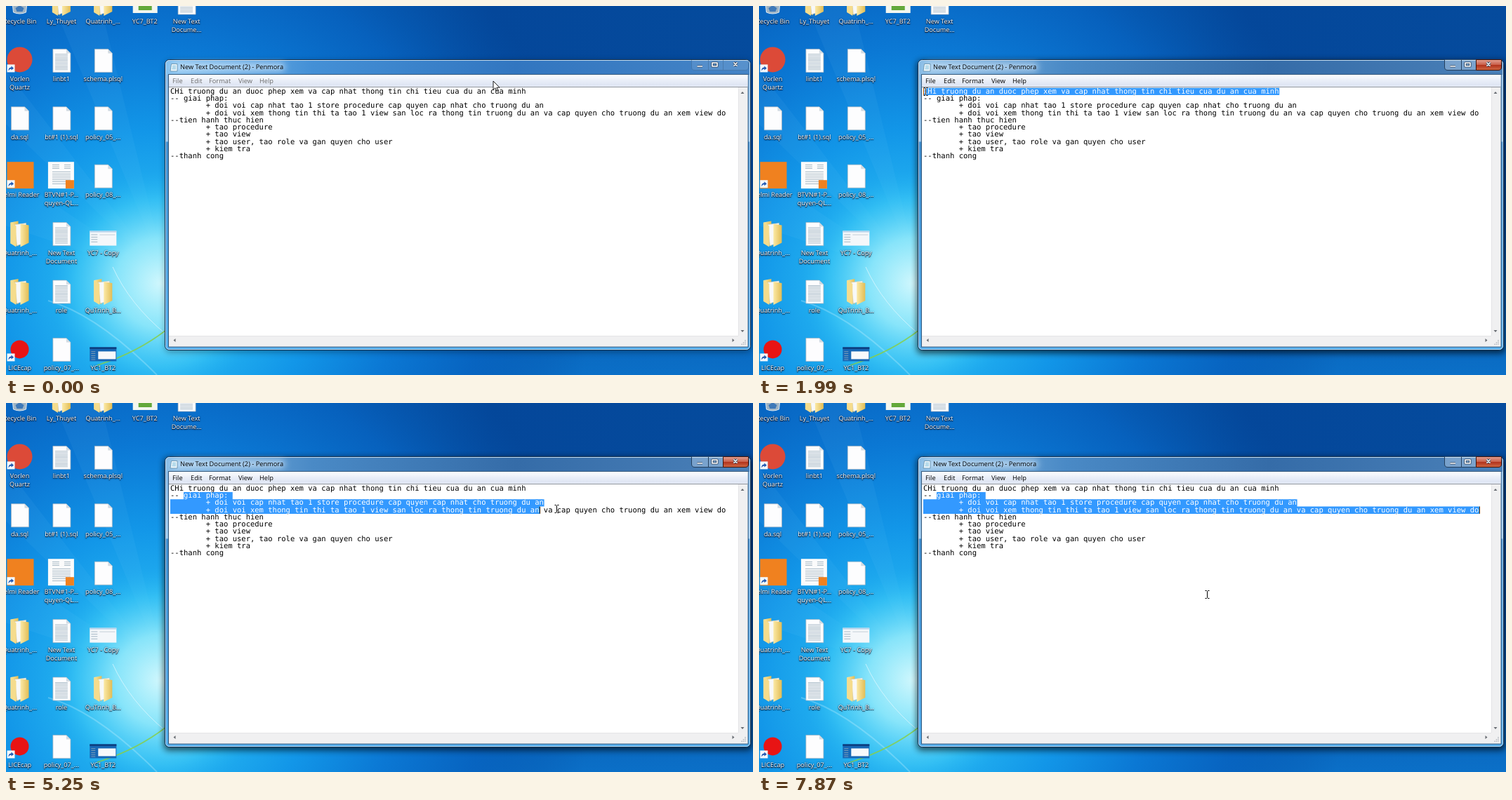
An HTML page for the animation above (8000 ms loop, 1064 px wide and 526 px high).

```html
<!DOCTYPE html>
<html lang="vi">
<head>
<meta charset="utf-8">
<title>Desktop</title>
<style>
  html, body { margin: 0; width: 100%; height: 100%; overflow: hidden; background: #0a56a8; }
  svg { display: block; width: 100vw; height: 100vh; }
  text { text-rendering: geometricPrecision; font-family: "Open Sans", "Noto Sans", sans-serif; }
  #icons text { font-size: 9.1px; fill: #fff; text-anchor: middle; filter: drop-shadow(.5px 1px .6px #012) drop-shadow(0 0 .8px #013c); }
  .ui { font-size: 9.25px; }
  .menu { fill: #6d6d6d; }
  .code text { font: 10.53px "DejaVu Sans Mono", "Liberation Mono", monospace; white-space: pre; }
  .active, .on .idle { display: none; }
  .on .active { display: inline; }
  .on .menu { fill: #000; }
  .invert { fill: none; stroke: #fff; mix-blend-mode: difference; }
</style>
</head>
<body>
<svg id="stage" viewBox="0 0 1064 526" preserveAspectRatio="none">
  <defs>
    <linearGradient id="sky">
      <stop stop-color="#0a60bc"/><stop offset=".4" stop-color="#0553a9"/>
      <stop offset=".65" stop-color="#04479a"/><stop offset="1" stop-color="#054b9d"/>
    </linearGradient>
    <linearGradient id="floor" x2="0" y2="1">
      <stop offset=".55" stop-color="#0d7cd6" stop-opacity="0"/><stop offset="1" stop-color="#0d7cd6" stop-opacity=".75"/>
    </linearGradient>
    <radialGradient id="halo" gradientUnits="userSpaceOnUse" cx="215" cy="400" r="620">
      <stop stop-color="#5ad6f8"/><stop offset=".2" stop-color="#22b0f0"/>
      <stop offset=".36" stop-color="#1296e8"/><stop offset=".55" stop-color="#0b78d4"/>
      <stop offset=".75" stop-color="#0763c0" stop-opacity=".9"/><stop offset="1" stop-color="#0553a9" stop-opacity="0"/>
    </radialGradient>
    <radialGradient id="core" gradientUnits="userSpaceOnUse" cx="220" cy="395" r="160">
      <stop stop-color="#d0f7fd"/><stop offset=".4" stop-color="#94eafb" stop-opacity=".85"/>
      <stop offset=".75" stop-color="#44cdf7" stop-opacity=".5"/><stop offset="1" stop-color="#22b0f0" stop-opacity="0"/>
    </radialGradient>
    <linearGradient id="frame" x2="0" y2="1">
      <stop stop-color="#7fb2e0"/><stop offset=".28" stop-color="#9cc8ec"/>
      <stop offset=".285" stop-color="#3f8ccc"/><stop offset="1" stop-color="#55aeec"/>
    </linearGradient>
    <linearGradient id="barOn">
      <stop stop-color="#8abde6"/><stop offset=".25" stop-color="#4a8ac6"/>
      <stop offset=".6" stop-color="#356ca8"/><stop offset="1" stop-color="#4a80b8"/>
    </linearGradient>
    <linearGradient id="barOff">
      <stop stop-color="#86c2ef"/><stop offset=".25" stop-color="#4490d6"/>
      <stop offset=".6" stop-color="#3276c0"/><stop offset="1" stop-color="#4584c6"/>
    </linearGradient>
    <linearGradient id="menuBg" x2="0" y2="1">
      <stop stop-color="#fdfeff"/><stop offset=".5" stop-color="#e9eef8"/><stop offset="1" stop-color="#dce3f2"/>
    </linearGradient>
    <linearGradient id="red" x2="0" y2="1">
      <stop stop-color="#e3a193"/><stop offset=".48" stop-color="#c9604a"/>
      <stop offset=".5" stop-color="#b0301a"/><stop offset="1" stop-color="#d06a45"/>
    </linearGradient>
    <linearGradient id="yellow"><stop stop-color="#fbe9a6"/><stop offset="1" stop-color="#e2bd55"/></linearGradient>
    <filter id="blur" x="-20%" y="-60%" width="140%" height="220%"><feGaussianBlur stdDeviation="5"/></filter>
    <clipPath id="selClip"><path id="sel"/></clipPath>
  </defs>

  <rect width="1064" height="526" fill="url(#sky)"/>
  <rect width="1064" height="526" fill="url(#floor)"/>
  <rect width="1064" height="526" fill="url(#halo)"/>
  <g fill="#8fdcff" opacity=".06">
    <path d="M230 390L-40 40V130Z"/><path d="M230 390L-40 210V300Z"/><path d="M230 390L60-20H130Z"/>
  </g>
  <rect width="1064" height="526" fill="url(#core)"/>
  <g fill="none" stroke="#e6faff">
    <path d="M152 372Q176 425 228 468" opacity=".7"/>
    <path d="M60 420Q130 440 215 526" opacity=".25" stroke-width="2"/>
    <path d="M130 512Q185 495 228 462" stroke="#86cf4a" stroke-width="1.6" opacity=".85"/>
  </g>
  <g id="icons"></g>

  <rect class="idle" x="227" y="79" width="834" height="414" rx="6" filter="url(#blur)" opacity=".35"/>
  <rect class="active" x="225" y="78" width="838" height="417" rx="6" filter="url(#blur)" opacity=".65"/>
  <rect x="226.5" y="76.5" width="834" height="414" rx="6" fill="url(#frame)" stroke="#12304f"/>
  <path class="idle" d="M228 98V82Q228 78 232 78H1055Q1059 78 1059 82V98Z" fill="url(#barOff)"/>
  <path class="active" d="M228 98V82Q228 78 232 78H1055Q1059 78 1059 82V98Z" fill="url(#barOn)"/>
  <rect x="227.5" y="77.5" width="832" height="412" rx="5" fill="none" stroke="#dcefff" stroke-opacity=".7"/>
  <rect x="236" y="81" width="162" height="12" rx="6" fill="#e4f3ff" opacity=".6" filter="url(#blur)"/>
  <path d="M235.5 82.5H244V93H234Z" fill="#e9f5fb" stroke="#5f8ca8" stroke-width=".8"/>
  <path d="M237 85.5H242M237 87.5H242M236.5 89.5H242" stroke="#6db4d4" stroke-width=".8"/>
  <text class="ui" x="248" y="90.3">New Text Document (2) - Penmora</text>

  <g class="active" stroke="#24405e">
    <path d="M976.5 76.5V87Q976.5 91.5 981 91.5H1021.5V76.5M1000.5 77V91" fill="#d8e8f8" fill-opacity=".35"/>
    <path d="M1021.5 76.5H1057.5V87Q1057.5 91.5 1053 91.5H1021.5Z" fill="url(#red)" stroke="#431409"/>
  </g>
  <path class="idle" d="M976.5 77V87Q976.5 91.5 981 91.5H1053Q1057.5 91.5 1057.5 87V77M1000.5 77V91M1021.5 77V91"
        fill="#fff" fill-opacity=".1" stroke="#416c98" stroke-opacity=".55"/>
  <g fill="none" stroke-linejoin="round">
    <path d="M984.5 86H992M1006 81H1013V86H1006ZM1036.5 80.5L1041.5 85.5M1041.5 80.5L1036.5 85.5" stroke="#31445c" stroke-width="3.2"/>
    <path d="M984.5 86H992M1006 81H1013V86H1006ZM1036.5 80.5L1041.5 85.5M1041.5 80.5L1036.5 85.5" stroke="#fff" stroke-width="1.6"/>
  </g>

  <rect x="231.5" y="97.5" width="825.5" height="388.5" fill="#fff" stroke="#35597c"/>
  <rect x="232" y="98" width="824.5" height="16.5" fill="url(#menuBg)"/>
  <g class="ui menu">
    <text x="237" y="110">File</text><text x="263" y="110">Edit</text><text x="289" y="110">Format</text>
    <text x="331" y="110">View</text><text x="361" y="110">Help</text>
  </g>
  <path d="M232 115.5H1056" stroke="#8b919c"/>
  <path d="M1043 116H1056V485H232V470H1043Z" fill="#f0f0f1"/>
  <path d="M1043.5 116V470M232 470.5H1043" stroke="#e4e4e6"/>
  <path d="M1046.5 125L1049 122L1051.5 125ZM1046.5 462L1049 465L1051.5 462ZM241.5 474L238.5 476.5L241.5 479ZM1034.5 474L1037.5 476.5L1034.5 479Z" fill="#686c72"/>
  <path d="M1053 476V483M1050.5 479V483M1048 481.5V483" stroke="#b4b8bf" stroke-width="1.5" stroke-dasharray="1.5 1"/>

  <g class="code" id="page"></g>
  <g class="code" clip-path="url(#selClip)" fill="#fff">
    <rect x="232" y="116" width="811" height="110" fill="#3399ff"/>
    <g id="pageSel"></g>
  </g>
  <path id="caret" class="invert" d="M.5 0V10.2"/>
  <path id="beam" class="invert" d="M-3-5.5H-1L0-4.5L1-5.5H3M0-4.5V4.5M-3 5.5H-1L0 4.5L1 5.5H3"/>
  <path id="arrow" d="M0 0V12.5L2.9 9.8L4.9 14.3L6.8 13.4L4.9 9.2H9Z" fill="#fff" stroke="#000" stroke-width=".9"/>
</svg>
<script>
const $ = id => document.getElementById(id);

// Desktop icons
const page = '<path d="M-12-16H7L13-10V17H-12Z" fill="#fdfdfe" stroke="#a9b4bf" stroke-width=".7"/><path d="M7-16V-10H13Z" fill="#d3dbe2"/>';
const box = (x, y, w, h, fill) => `<rect x="${x}" y="${y}" width="${w}" height="${h}" fill="${fill}"/>`;
const rules = (x, y, w, n, gap) => Array.from({length: n}, (_, i) => box(x, y + i * gap, w, .8, '#93a9b8')).join('');
const shortcut = box(-18, 6, 11, 11, '#f4f8fc') +
  '<path d="M-16 15Q-16 10-12 10V8L-8.5 11.3L-12 14V12Q-14.5 12-16 15Z" fill="#1d55b0"/>';
const art = {
  page,
  doc: page + rules(-9, -9, 18, 11, 2.2),
  folder: '<path d="M-13-16L-2-18V18L-13 14Z" fill="url(#yellow)"/><path d="M-7-13L9-15V13L-4 17Z" fill="#f7f8f8" stroke="#c9c6b8" stroke-width=".6"/>' +
    '<path d="M1-14L13-12V13L1 19Z" fill="url(#yellow)"/><path d="M-13-16L-5-11V19L-13 14Z" fill="#f5dc8c"/>',
  bin: '<path d="M-12-16H12L9 14Q0 18-9 14Z" fill="#9fb4c4" stroke="#e3edf4"/><path d="M-6 8L0 4L6 8L4 13H-4Z" fill="#3f79b8"/>',
  image: box(-17, -16, 35, 31, '#f3f6ef') + box(-9, -9, 19, 20, '#63a83a'),
  browser: '<circle cy="-1" r="18" fill="#dc4a38"/>' + shortcut,
  reader: box(-18, -20, 38, 38, '#f0811f') + shortcut,
  pdf: box(-19, -20, 37, 38, '#fbfbfb') + rules(-13, -16, 10, 3, 2.5) + rules(4, -16, 9, 3, 2.5) +
    rules(-13, -6, 26, 7, 2.8) + box(6, 6, 12, 12, '#f0811f'),
  shot: box(-19, -4, 38, 21, '#f4f7fa') + box(-19, -4, 38, 2, '#b9d3ea') + rules(-17, 1, 9, 4, 3.4) + box(-5, 1, 22, 1, '#c5cfd8'),
  screen: box(-19, -3, 38, 20, '#1767b5') + box(-19, -3, 38, 2.5, '#0d3d7d') + box(-7, 3, 25, 11, '#f7f9fb') + rules(-17, 3, 6, 5, 2.8),
  recorder: '<circle r="13" fill="#e81414"/>' + shortcut
};
const desk = [
  ['bin:Recycle Bin', 'folder:Ly_Thuyet', 'folder:Quatrinh_...', 'image:YC7_BT2', 'doc:New Text|Docume...'],
  ['browser:Vorlen|Quartz', 'doc:linbt1', 'page:schema.plsql'],
  ['page:da.sql', 'page:bt#1 (1).sql', 'page:policy_05_...'],
  ['reader:Velmi Reader', 'pdf:BTVN#1-P...|quyen-QL...', 'page:policy_08_...'],
  ['folder:Quatrinh_...', 'doc:New Text|Document', 'shot:YC7 - Copy'],
  ['folder:Quatrinh_...', 'doc:role', 'folder:QuTrinh_B...'],
  ['recorder:LICEcap', 'page:policy_07_...', 'screen:YC1_BT2']
];
$('icons').innerHTML = desk.map((row, r) => row.map((item, c) => {
  const [kind, label] = item.split(':');
  const names = label.split('|').map((s, i) => `<text y="${30 + i * 12}">${s}</text>`).join('');
  return `<g transform="translate(${19.5 + c * 59.4} ${-5 + r * 82.4})">${art[kind]}${names}</g>`;
}).join('')).join('');

// Document text
const LEFT = 234, TOP = 116.8, CHAR = 6.34, LINE = 10.27, TAB = '        ';
const lines = [
  'CHi truong du an duoc phep xem va cap nhat thong tin chi tieu cua du an cua minh',
  '-- giai phap: ',
  TAB + '+ doi voi cap nhat tao 1 store procedure cap quyen cap nhat cho truong du an',
  TAB + '+ doi voi xem thong tin thi ta tao 1 view san loc ra thong tin truong du an va cap quyen cho truong du an xem view do',
  '--tien hanh thuc hien',
  TAB + '+ tao procedure',
  TAB + '+ tao view',
  TAB + '+ tao user, tao role va gan quyen cho user',
  TAB + '+ kiem tra',
  '--thanh cong'
];
$('page').innerHTML = $('pageSel').innerHTML =
  lines.map((s, i) => `<text x="${LEFT}" y="${TOP + i * LINE + 8}">${s}</text>`).join('');

// Screen refreshes: first time, last time, count
const runs = [[0, 0, 1], [150, 720, 5], [1020, 1320, 3], [1440, 1990, 5], [2120, 2680, 5], [2960, 2960, 1],
  [3270, 3420, 2], [3570, 4280, 6], [4420, 4690, 3], [4810, 5390, 5], [5510, 5750, 3], [6050, 6880, 7], [7170, 7870, 6]];
const ticks = runs.flatMap(([a, b, n]) => Array.from({length: n}, (_, i) => a + (b - a) * i / Math.max(1, n - 1)));

// Pointer path: time, x, y
const path = [[0, 694, 107], [720, 750, 122], [1020, 750, 122], [1250, 363, 150], [1320, 303, 156], [1580, 262, 136],
  [1860, 237, 122], [1990, 237, 122], [2680, 374, 257], [3130, 374, 257], [3420, 370, 261], [3430, 370, 261],
  [4280, 253, 132], [4420, 253, 132], [4690, 397, 147], [5240, 780, 151], [5390, 945, 152], [5750, 1046, 147],
  [5910, 1046, 147], [6470, 1038, 161], [6740, 1031, 152], [7030, 1031, 152], [7870, 638, 273], [8000, 638, 273]];
const drags = [{from: 1020, to: 1900, anchor: [0, 80]}, {from: 4280, to: 6780, anchor: [1, 3]}];
const LAG = 30, BLINK = 530;

const rate = (i, c) => path[i] && path[i - 1] ? (path[i][c] - path[i - 1][c]) / (path[i][0] - path[i - 1][0]) : 0;

// Slope at a point of the path; zero where the pointer rests or turns
function slope(i, c) {
  const a = rate(i, c), b = rate(i + 1, c);
  return a * b > 0 ? 2 * a * b / (a + b) : 0;
}

function pointer(t) {
  const i = Math.max(1, path.findIndex(p => p[0] >= t)), p = path[i - 1], q = path[i];
  const h = q[0] - p[0], k = (t - p[0]) / h, s = k * k * (3 - 2 * k);
  return [1, 2].map(c => p[c] + (q[c] - p[c]) * s +
    h * k * (1 - k) * ((1 - k) * slope(i - 1, c) - k * slope(i, c)));
}

function textPos([x, y]) {
  const row = Math.max(0, Math.min(lines.length - 1, Math.floor((y - TOP) / LINE)));
  return [row, Math.max(0, Math.min(lines[row].length, Math.round((x - LEFT) / CHAR)))];
}

function selection(a, b) {
  const [start, end] = [a, b].sort((p, q) => p[0] - q[0] || p[1] - q[1]);
  let d = '';
  for (let r = start[0]; r <= end[0]; r++) {
    const c0 = r === start[0] ? start[1] : 0, c1 = r === end[0] ? end[1] : lines[r].length;
    d += `M${LEFT + c0 * CHAR} ${TOP + r * LINE}h${(c1 - c0) * CHAR}v${LINE}H${LEFT + c0 * CHAR}Z`;
  }
  return d;
}

function place(id, x, y, shown) {
  $(id).setAttribute('transform', `translate(${x} ${y})`);
  $(id).style.display = shown ? '' : 'none';
}

function draw(now) {
  const t = ticks.findLast(k => k <= now % 8000 + .01);
  const [x, y] = pointer(t), inText = y > 115;
  place('arrow', x, y, !inText);
  place('beam', Math.round(x) + .5, Math.round(y), inText);
  $('stage').classList.toggle('on', t >= 1020);

  const drag = drags.findLast(d => d.from <= t);
  let d = '', row = 0, col = 0, lit = false;
  if (drag) {
    [row, col] = textPos(pointer(Math.max(drag.from, Math.min(t - LAG, drag.to))));
    d = selection(drag.anchor, [row, col]);
    lit = t < drag.to || Math.floor((t - drag.to) / BLINK) % 2 === 0;
  }
  $('sel').setAttribute('d', d);
  place('caret', Math.floor(LEFT + col * CHAR), TOP + row * LINE, lit);
  requestAnimationFrame(draw);
}
requestAnimationFrame(draw);
</script>
</body>
</html>
```
